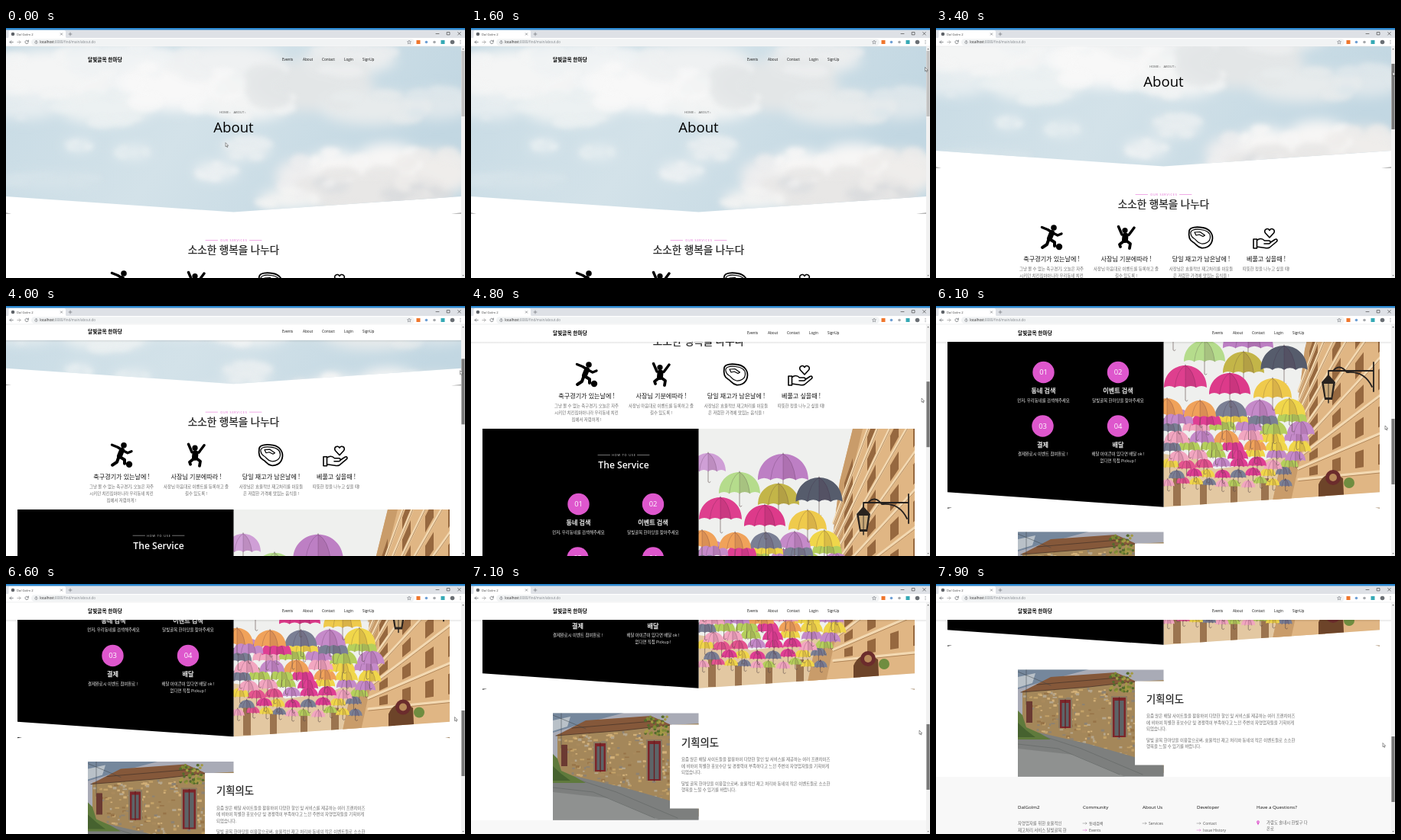
An HTML page that plays this animation: 600 px wide and 328 px high, repeating every 8000 ms.

```html
<!DOCTYPE html>
<html lang="ko">
<head>
<meta charset="utf-8">
<title>Dal Golm 2</title>
<style>
html, body { margin: 0; width: 100%; height: 100%; overflow: hidden; background: #fff; }
svg { display: block; width: 600px; height: 328px; }
text { font-family: "Open Sans", "Noto Sans CJK KR", "Noto Sans CJK", sans-serif; white-space: pre; }
</style>
</head>
<body>
<svg id="stage" viewBox="0 0 600 328" xmlns="http://www.w3.org/2000/svg"></svg>
<script>
const PINK = '#de57cd', INK = '#222', GREY = '#686868';
const BRAND = '달빛골목 한마당';

// Markup helpers; text is placed by its vertical centre.
const text = (x, y, str, size, fill = INK, anchor = 'start', extra = '') =>
  `<text x="${x}" y="${y + size * 0.36}" font-size="${size}" fill="${fill}" text-anchor="${anchor}" ${extra}>${str}</text>`;
const mid = (x, y, str, size, fill, extra) => text(x, y, str, size, fill, 'middle', extra);
const rect = (x, y, w, h, fill, extra = '') =>
  `<rect x="${x}" y="${y}" width="${w}" height="${h}" fill="${fill}" ${extra}/>`;
const circle = (x, y, r, fill) => `<circle cx="${x}" cy="${y}" r="${r}" fill="${fill}"/>`;
const oval = (x, y, rx, ry, fill) => `<ellipse cx="${x}" cy="${y}" rx="${rx}" ry="${ry}" fill="${fill}"/>`;
const shape = (d, fill, extra = '') => `<path d="${d}" fill="${fill}" ${extra}/>`;
const line = (d, stroke, w = 1, extra = '') =>
  `<path d="${d}" fill="none" stroke="${stroke}" stroke-width="${w}" stroke-linecap="round" stroke-linejoin="round" ${extra}/>`;
// A thin outline gives a weight between regular and bold.
const medium = color => `stroke="${color}" stroke-width=".25"`;
const BOLD = 'font-weight="700"';

function seeded(seed) {
  return () => (seed = (seed * 16807) % 2147483647) / 2147483647;
}

function hero() {
  const rnd = seeded(23);
  const clouds = [
    [60, 60, 85, 32, '#f4f5f5'], [150, 45, 70, 26, '#f0f3f4'], [25, 105, 45, 15, '#e6edf0'],
    [130, 105, 62, 22, '#ecf1f2'], [225, 75, 75, 34, '#f8f8f8'], [290, 45, 75, 24, '#eff1f2'],
    [320, 95, 58, 26, '#f3f4f4'], [400, 75, 80, 34, '#e3e6e7'], [450, 40, 60, 20, '#eceeef'],
    [480, 105, 70, 22, '#e7ebec'], [565, 100, 45, 20, '#dfe7eb'], [95, 154, 18, 6, '#f0f4f5'],
    [165, 163, 24, 8, '#e9f0f2'], [275, 188, 28, 11, '#f0f3f4'], [315, 158, 32, 14, '#eaeff1'],
    [60, 200, 65, 9, '#d7e4ea'], [390, 195, 38, 24, '#eeeeef'], [430, 180, 34, 20, '#f8f7f6'],
    [500, 175, 44, 24, '#f7f6f5'], [560, 190, 50, 30, '#efedeb'], [470, 215, 95, 30, '#e8e7e6'],
    [370, 225, 40, 13, '#f4f4f3'], [535, 220, 42, 14, '#dadcde'], [425, 205, 22, 9, '#dddfe1']
  ];
  const puffs = clouds.map(([x, y, rx, ry, c]) => {
    let s = '';
    for (let i = 0; i < 9; i++) {
      const a = rnd() * Math.PI * 2, k = 0.15 + rnd() * 0.2;
      s += oval(x + Math.cos(a) * rx * 0.85, y + Math.sin(a) * ry * 0.85, rx * k, ry * k * 1.2, c);
    }
    return s;
  }).join('');
  return `<g clip-path="url(#heroClip)"><g id="sky">${rect(-5, 0, 610, 260, 'url(#skyFill)')}
      <g filter="url(#soft)">${clouds.map(c => oval(...c)).join('')}</g>
      <g filter="url(#crisp)" opacity=".75">${puffs}</g></g></g>
    ${shape('M0 242.5L7 243.4H0ZM595 242.5L582 243.6H595Z', '#777')}
    ${text(279, 111, 'HOME ›', 4.1, '#555')}${text(297.5, 111, 'ABOUT ›', 4.1, '#555')}
    ${mid(297.5, 130.5, 'About', 18.6, '#000')}`;
}

function eyebrow(x, y, str, color, gap) {
  return mid(x + 0.4, y, str, 3.75, color, 'letter-spacing="0.85"') +
    line(`M${x - gap - 16} ${y}h15.5M${x + gap + 0.5} ${y}h15.5`, color, 0.5);
}

function icons() {
  const kick = circle(154, 322, 3.8, '#000') +
    line('M138.5 321.5L146 324.5L153 329L159 332L164 330', '#000', 3.4) +
    line('M151.5 328.5L148.5 336', '#000', 7) +
    line('M148.5 337L155 341L155 346M147.5 337L145 344L139 348', '#000', 4) +
    circle(161, 347, 4.2, '#000');
  const jump = circle(247, 325.5, 3.6, '#000') +
    line('M238.5 320.5L243 331M259 322L252 331.5', '#000', 3.4) +
    line('M247.5 332.5L247 338', '#000', 8) +
    line('M245 340L240 344L241 347M250 340L254 343L253 349', '#000', 3.8);
  const steak = line('M331 326C332 321 341 320.5 349 322C358 323.5 363 331 361 339C359 347 352 349 347 348.5C341 347.5 340 343 336 341C331 338.5 330 332 331 326Z', '#000', 1.8) +
    line('M333 330C332 325 338 323.5 346 324.5C354 325.5 358.5 329 358.5 334C358.5 341 352 343.5 347 343C341 342 341 338 337 336C334.5 334.5 333.5 333 333 330Z', '#000', 1.2) +
    line('M338 328L345 327.5L351.5 332L349 333.5L344 331L340 332Z', '#000', 1.2);
  const care = line('M436 335L430.5 329C427.5 325 433.5 321 436 325.5C438.5 321 444.5 325 441.5 329Z', '#000', 1.6) +
    line('M415 337H419.5V349H415ZM419.5 338.5C424 335 427 336.5 429.5 339H435C438 339 437.5 343 435 343H429M437 341.5L443 337.5C446 336 447 339 445 340.5L436 348C434 349 432 349 430 348.5L419.5 347', '#000', 1.6);
  return kick + jump + steak + care;
}

function services() {
  const cards = [
    [151, '축구경기가 있는날에 !', '그냥 볼 수 없는 축구경기, 오늘은 자주', '시키던 치킨집이아니라 우리동네 치킨', '집에서 저렴하게 !'],
    [248.5, '사장님 기분에따라 !', '사장님 마음대로 이벤트를 등록하고 즐', '길수 있도록 !'],
    [346.5, '당일 재고가 남은날에 !', '사장님은 효율적인 재고처리를 이웃들', '은 저렴한 가격에 맛있는 음식을 !'],
    [431.5, '베풀고 싶을때 !', '따뜻한 정을 나누고 싶을 때!']
  ];
  return eyebrow(297.5, 278.5, 'OUR SERVICES', PINK, 20.5) +
    mid(297.5, 291, '소소한 행복을 나누다', 13.6, INK, medium(INK)) + icons() +
    cards.map(([x, title, ...rows]) => mid(x, 363, title, 8.1, '#111') +
      rows.map((row, i) => mid(x, 376 + i * 9.1, row, 5.4, GREY)).join('')).join('');
}

function umbrella(x, top, w, color) {
  const h = w * 0.52, r = w / 2, y = top + h;
  const rib = k => `Q${x + k * w * 0.8} ${top + h * 0.2} ${x + k * w} ${y}`;
  const scallop = `q${-w / 8} ${-w * 0.08} ${-w / 4} 0`;
  return line(`M${x} ${top - 1}V${y + w * 0.3}q1.5 2 3 0`, '#5c4a48', 0.6) +
    shape(`M${x - r} ${y}C${x - r} ${top + h * 0.35} ${x - r / 2} ${top} ${x} ${top}S${x + r} ${top + h * 0.35} ${x + r} ${y}${scallop.repeat(4)}Z`, color) +
    shape(`M${x} ${top}${rib(0.25)}q${-w / 8} ${-w * 0.08} ${-w / 4} 0L${x} ${top}Z`, 'rgba(70,20,50,.13)') +
    line([-0.25, 0, 0.25].map(k => `M${x} ${top}${rib(k)}`).join(''), 'rgba(50,20,50,.4)', 0.5);
}

function street() {
  const rnd = seeded(41);
  const tones = ['#df3f93', '#f0d64a', '#c58ac9', '#f2a6c0', '#e4558f', '#b5cf5c', '#7a7f94', '#f0a25a'];
  const big = [
    [408, 439, 66, '#bd7fc4'], [310, 438, 46, '#cf9fd6'], [351, 463, 54, '#b5dc8c'],
    [402, 478, 54, '#c3b548'], [455, 470, 61, '#565c6c'], [326, 496, 56, '#de3f8e'],
    [384, 506, 54, '#dd3a8a'], [440, 513, 50, '#efca4c']
  ];
  let small = '';
  for (let row = 0; row < 9; row++) {
    const w = 42 - row * 3, right = 490 - row * 4;
    for (let x = 302 + (row % 2) * 12; x < right; x += w * 0.95)
      small = umbrella(x + rnd() * 4, 537 + row * 13 + rnd() * 6, w, tones[Math.floor(rnd() * 8)]) + small;
  }
  // Cornices and windows follow rays from one vanishing point.
  const vx = 430, vy = 650;
  const onRay = (x, slope) => `${x} ${vy - (x - vx) * slope}`;
  let ledges = '', windows = '';
  for (let i = 0; i < 9; i++) {
    const s = 0.1 + i * 0.33;
    ledges += `M${onRay(474, s)}L${onRay(590, s)}`;
    for (let x = 488; x < 580; x += 30)
      windows += shape(`M${onRay(x, s + 0.06)}L${onRay(x + 11, s + 0.06)}L${onRay(x + 11, s + 0.24)}L${onRay(x, s + 0.24)}Z`, '#96683f');
  }
  return rect(297.5, 406, 283, 277, '#eff0ee') +
    shape('M297.5 612L340 618L365 632L420 625L450 612L500 606V683H297.5Z', '#e3c8a2') +
    shape('M310 640h10v40h-10zM345 648h9v34h-9zM385 652h9v30h-9zM425 644h10v38h-10z', '#9b744f') +
    shape('M499 406H580V683H438L448 636L467 596L482 475Z', '#e0b684') +
    shape('M499 406H512L494 480L480 600L462 683H438L448 636L467 596L482 475Z', '#c99c6a') +
    windows + line(ledges, '#f3d9b2', 3.5) + line(ledges, '#9a6d43', 0.7, 'transform="translate(0 2)"') +
    shape('M500 652q10 -22 32 -8l2 40h-34z', '#6d4429') + circle(519, 643, 10, '#6b2c2c') +
    circle(519, 643, 5, '#b98a5a') + circle(540, 650, 7, '#6f8d40') +
    small + big.map(u => umbrella(...u)).join('') +
    line('M572 492V530M572 503H513V510M570 524Q560 503 538 505M537 505q-9 -12 -18 -2', '#25211f', 1.8) +
    shape('M504 518L513 508L522 518L518 541H508Z', '#29231f') + line('M513 541v4', '#29231f', 1.5) +
    shape('M507 520H519L516.5 538H509.5Z', '#c9a878') + line('M513 520V538', '#29231f', 0.8);
}

function guide() {
  const steps = [
    [140.5, 505, '01', '동네 검색', '먼저, 우리동네를 검색해주세요'],
    [238, 505, '02', '이벤트 검색', '달빛골목 한마당을 찾아주세요'],
    [139.5, 575.5, '03', '결제', '결제완료시 이벤트 참여완료 !'],
    [238, 575.5, '04', '배달', '배달 아이콘이 있다면 배달 ok !', '없다면 직접 Pickup !']
  ];
  return `<g clip-path="url(#guideClip)">${street()}${rect(15, 406, 282.5, 277, '#000')}</g>` +
    shape('M15 682.6H21L15 683.8Z', '#222') + shape('M580 682.6H574L580 683.8Z', '#a58a6a') +
    eyebrow(199.5, 440.5, 'HOW TO USE', '#e4e4e4', 17.5) +
    mid(199.5, 454, 'The Service', 12.1, '#fff', 'font-weight="600"') +
    steps.map(([x, y, no, title, ...rows]) => circle(x, y, 14.2, PINK) + mid(x, y, no, 9.4, '#fff') +
      mid(x, y + 24.3, title, 8.1, '#fff', medium('#fff')) +
      rows.map((row, i) => mid(x, y + 37 + i * 9, row, 5.4, '#eee')).join('')).join('');
}

function house() {
  const rnd = seeded(97);
  const tones = ['#c4a268', '#a98a5c', '#8d8272', '#d2b078', '#977448', '#b5a68c'];
  const leaves = ['#7d8a35', '#a39a45', '#556b2c'];
  let stones = '', ivy = '';
  for (let i = 0; i < 420; i++) {
    const x = 113 + rnd() * 185, y = 738 + rnd() * 108;
    stones += rect(x.toFixed(1), y.toFixed(1), (2 + rnd() * 4).toFixed(1), (1.5 + rnd() * 2).toFixed(1), tones[i % 6]);
  }
  for (let i = 0; i < 60; i++)
    ivy += circle((228 + rnd() * 30).toFixed(1), (719 + rnd() * 24).toFixed(1), 1.8, leaves[i % 3]);
  const door = (x, y, w, h) => rect(x - 2, y - 2, w + 4, h + 2, '#8c7a60') + rect(x, y, w, h, '#7d2529') +
    rect(x + 2.5, y + 4, w - 5, h - 6, '#5d6468') + line(`M${x + w / 2} ${y}v${h}`, '#6a1e22', 1.4);
  return `<g clip-path="url(#houseClip)">
    ${rect(107, 714, 191, 141, '#a9abb6')}
    ${shape('M107 714H200L140 730L107 740Z', '#75879c')}${shape('M107 724L130 719L126 732L107 738Z', '#b9c1c8')}
    ${shape('M113 742L200 735L262 730L298 728V850L113 800Z', '#a4875a')}${stones}
    ${shape('M111 744L150 724L235 718L262 730L200 737Z', '#85583a')}
    ${line('M111 744L200 737L262 730M132 734L250 724', '#523a2c', 0.9)}${ivy}
    ${line('M107 717L150 735M118 714V760', '#3b4348', 0.5)}
    ${rect(118, 756, 8, 28, '#6b3a32')}${door(162, 754, 14, 37)}${door(231, 751, 17, 52)}
    ${shape('M107 796L135 797L200 812L298 840V856H107Z', '#7d7f7e')}
    ${shape('M107 818L180 826L250 856H107Z', '#8f9190')}
    ${line('M107 812L160 818L240 852M135 800L190 818L270 852', '#676b6a', 0.8)}
    ${shape('M107 768L113 774L118 790L136 798L150 806L107 806Z', '#5f7a3c')}
    ${shape('M107 784L118 794L130 803H107Z', '#46622f')}</g>`;
}

function about() {
  const rows = [
    [775.5, '요즘 많은 배달 사이트들을 활용하여 다양한 할인 및 서비스를 제공하는 여러 프랜차이즈'],
    [784, '에 비하여 특별한 홍보수단 및 경쟁력이 부족하다고 느낀 주변의 자영업자들을 기획하게'],
    [792.5, '되었습니다.'],
    [807, '달빛 골목 한마당을 이용함으로써, 효율적인 재고 처리와 동네의 작은 이벤트들로 소소한'],
    [815.5, '행복을 느낄 수 있기를 바랍니다.']
  ];
  return house() + rect(260, 729.5, 228, 110, '#fff') +
    text(275, 753, '기획의도', 13.3, INK, 'start', medium(INK)) +
    rows.map(([y, row]) => text(275, y, row, 5.42, GREY)).join('');
}

function footer() {
  const link = (x, row, str) => {
    const y = 916 + row * 9, c = row ? PINK : '#777';
    return line(`M${x} ${y}h5m-1.3 -1.2l1.3 1.2l-1.3 1.2`, c, 0.5) + text(x + 8, y, str, 5, '#555');
  };
  const heads = [[107, 'DalGolm2'], [192, 'Community'], [270, 'About Us'], [341, 'Developer'], [419, 'Have a Questions?']];
  return rect(0, 855, 595, 120, '#f8f8f8') + heads.map(([x, str]) => text(x, 895, str, 6.15, '#111')).join('') +
    text(107, 916, '자영업자를 위한 효율적인', 5.4, '#666') + text(107, 925, '재고처리 서비스 달빛골목 한', 5.4, '#666') +
    link(192, 0, '동네검색') + link(192, 1, 'Events') + link(270, 0, 'Services') +
    link(341, 0, 'Contact') + link(341, 1, 'Issue History') +
    shape('M421 918.5L419.4 915.3A1.9 1.9 0 1 1 422.6 915.3Z', PINK) + circle(421, 914.3, 0.7, '#f8f8f8') +
    text(432, 915.5, '가람도 솔내시 한빛구 다', 5.4, '#666') + text(432, 923, '온로', 5.4, '#666');
}

function navItems(y) {
  const links = [[361, 'Events'], [388, 'About'], [413, 'Contact'], [442, 'Login'], [466, 'SignUp']];
  return text(107, y, BRAND, 6.7, '#000', 'start', BOLD) +
    links.map(([x, str]) => text(x, y + 0.3, str, 4.7, '#111')).join('');
}

function browser() {
  const icon = '#5f6368';
  return rect(0, 0, 600, 14, '#dee1e6') + rect(0, 0, 600, 2.5, '#2c86cd') +
    shape('M1 13.5Q3.5 13.5 3.5 11V5Q3.5 3 5.5 3H76Q78 3 78 5V11Q78 13.5 80.5 13.5Z', '#fff') +
    rect(0, 13, 600, 11, '#fff') + rect(0, 23.7, 600, 0.5, '#dcdee0') +
    circle(9, 8, 2.3, icon) + text(14, 8, 'Dal Golm 2', 4.2, '#444') +
    line('M71.3 6.8l2.4 2.4m0 -2.4l-2.4 2.4M82 8h4M84 6v4', icon, 0.6) +
    line('M562 7.5h4M590.7 5.5l3.6 3.6m0 -3.6l-3.6 3.6M576.6 5.5h3.4v3.4h-3.4z', '#222', 0.55) +
    line('M9.3 18.5H5m2 -2l-2 2l2 2', icon, 0.7) + line('M14.8 18.5h4.3m-2 -2l2 2l-2 2', '#999', 0.7) +
    line('M29 17.2a2.2 2.2 0 1 0 .3 1.8M29.4 16v1.7h-1.7', icon, 0.7) +
    rect(33, 14.3, 501, 8.6, '#f1f3f4', 'rx="4.3"') +
    line('M39.5 16.7a1.9 1.9 0 1 0 .01 0M39.5 18.4v1.2M39.5 17.5v.1', icon, 0.5) +
    text(44, 18.5, '<tspan fill="#222">localhost</tspan>:8080/find/main/about.do', 4.5, '#80868b') +
    shape('M527 16l.7 1.7 1.8.1-1.4 1.2.5 1.8-1.6-1-1.6 1 .5-1.8-1.4-1.2 1.8-.1z', 'none', `stroke="${icon}" stroke-width=".5"`) +
    rect(536.5, 16, 5, 5, '#f0762c') + circle(549.5, 18.5, 1.8, '#6e9fd4') +
    circle(560, 18.5, 1.8, '#a5a8ab') + rect(568.5, 16, 5, 5, '#35a9b5') +
    circle(583.5, 18.5, 2.8, '#6b7075') +
    circle(594, 16.5, 0.5, icon) + circle(594, 18.5, 0.5, icon) + circle(594, 20.5, 0.5, icon);
}

const stage = document.getElementById('stage');
stage.innerHTML = `<defs>
    <linearGradient id="skyFill" x2="1" y2=".3">
      <stop offset="0" stop-color="#c6dae4"/><stop offset=".5" stop-color="#d3e2e9"/><stop offset="1" stop-color="#c2d7e2"/>
    </linearGradient>
    <linearGradient id="shade" x2="0" y2="1">
      <stop offset="0" stop-color="#000" stop-opacity=".1"/><stop offset="1" stop-color="#000" stop-opacity="0"/>
    </linearGradient>
    <filter id="soft" x="-10%" y="-20%" width="120%" height="140%"><feGaussianBlur stdDeviation="8"/></filter>
    <filter id="crisp" x="-10%" y="-20%" width="120%" height="140%"><feGaussianBlur stdDeviation="3"/></filter>
    <clipPath id="heroClip"><path d="M0 24H595V221L297.5 241.5L0 221Z"/></clipPath>
    <clipPath id="guideClip"><path d="M15 406H580V662.3L297.5 681.8L15 662.3Z"/></clipPath>
    <clipPath id="houseClip"><path d="M107 714.5H297.5V854.5H107Z"/></clipPath>
  </defs>
  ${rect(0, 0, 600, 328, '#fff')}
  <g id="page">${hero()}<g id="topNav">${navItems(41.5)}</g>${services()}${guide()}${about()}${footer()}</g>
  <g id="stickyNav">${rect(0, 47, 595, 3, 'url(#shade)')}${rect(0, 24, 595, 23, '#fff')}${navItems(35.5)}</g>
  ${browser()}
  ${rect(595, 24, 5, 304, '#f1f1f1')}
  ${shape('M596.4 28.2L597.6 26.8L598.8 28.2ZM596.4 324.2L597.6 325.6L598.8 324.2Z', '#555')}
  ${rect(595.4, 30, 4.2, 86, '#c1c1c1', 'id="thumb"')}
  <path id="cursor" d="M0 0V5.2L1.2 4.1L2 6L2.9 5.6L2.1 3.8H3.7Z" fill="#fff" stroke="#333" stroke-width=".5"/>`;

const [page, sky, topNav, stickyNav, thumb, cursor] =
  ['page', 'sky', 'topNav', 'stickyNav', 'thumb', 'cursor'].map(id => document.getElementById(id));

const LOOP = 8000, STEP = 100, GRAB = 2900, HIDE_AT = 47, WAKE = 3770, SLIDE = 300;
const scrollKeys = [[GRAB, 0], [3400, 60], [4800, 245], [6100, 418], [7100, 545], [7500, 583], [7900, 602]];
const cursorKeys = [
  [200, 287, 150.5], [1000, 593.5, 51.5], [2200, 593.5, 51.5], [2700, 597, 44], [GRAB, 597, 44], [3400, 597, 57.5],
  [4800, 589, 121], [6100, 587, 157], [7100, 586, 192], [7900, 584, 208.5]
];

// Linear interpolation of one column of a key list.
function at(keys, t, col) {
  const i = keys.findIndex(k => k[0] >= t);
  if (i < 0) return keys[keys.length - 1][col];
  if (i === 0) return keys[0][col];
  const a = keys[i - 1], b = keys[i];
  return a[col] + (b[col] - a[col]) * (t - a[0]) / (b[0] - a[0]);
}

const move = (node, x, y) => node.setAttribute('transform', `translate(${x} ${y})`);

function draw(t) {
  const scroll = at(scrollKeys, t, 1);
  const wake = Math.min(1, Math.max(0, (t - WAKE) / SLIDE));
  move(page, 0, -scroll);
  move(sky, 0, scroll / 2);
  topNav.setAttribute('visibility', scroll > HIDE_AT ? 'hidden' : 'visible');
  move(stickyNav, 0, -40 * (1 - wake) ** 2);
  thumb.setAttribute('y', 30 + scroll * 0.2824);
  thumb.setAttribute('fill', t >= GRAB ? '#787878' : '#c1c1c1');
  move(cursor, at(cursorKeys, t, 1), at(cursorKeys, t, 2));
}

function tick() {
  draw(Math.floor(((performance.now() + 1) % LOOP) / STEP) * STEP);
  requestAnimationFrame(tick);
}
tick();
</script>
</body>
</html>
```
